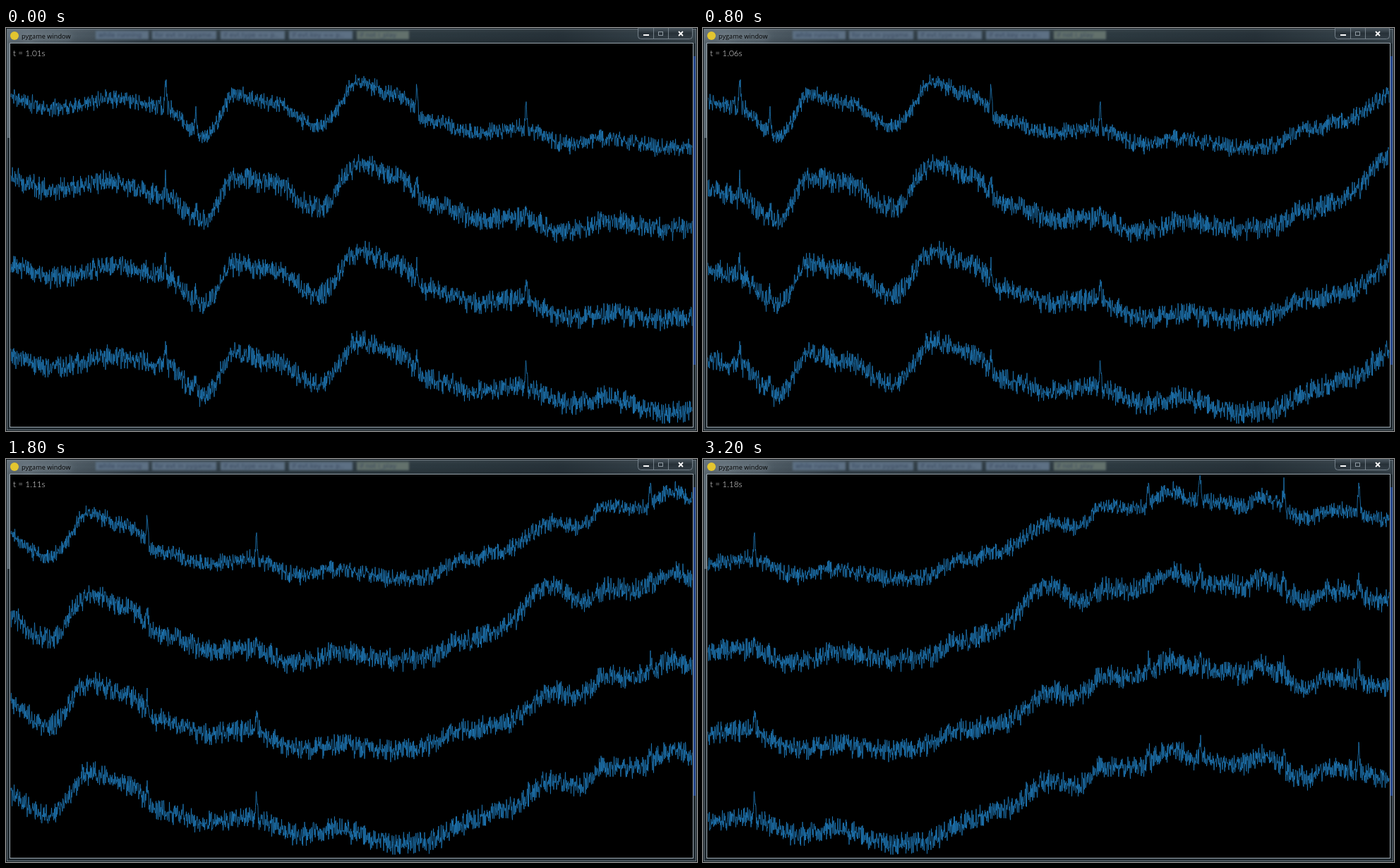
An HTML page with a canvas that plays this animation: 979x572 px, repeating every 3400 ms.

```html
<!DOCTYPE html>
<html lang="en">
<head>
<meta charset="utf-8">
<title>pygame window</title>
<style>
  html, body { margin: 0; width: 100%; height: 100%; overflow: hidden; background: #000; }
  canvas { display: block; }
</style>
</head>
<body>
<canvas id="stage" width="979" height="572"></canvas>
<script>
const W = 979, H = 572, STEP = 200, LOOP = 3400;
const LEFT = 7, RIGHT = 972, WORLD = 1645;
const DENSITY = 2; // samples per pixel
const ctx = document.getElementById('stage').getContext('2d');

// Turning points of the slow wave: x, y
const turns = [
  [0, 97], [60, 114], [160, 100], [224, 112], [280, 155], [326, 95], [380, 107], [442, 140],
  [502, 78], [552, 95], [600, 132], [670, 150], [725, 142], [800, 165], [850, 156], [930, 169],
  [975, 167], [1031, 144], [1086, 130], [1156, 90], [1196, 96], [1231, 70], [1280, 70],
  [1328, 45], [1360, 58], [1435, 66], [1455, 54], [1520, 86], [1550, 71], [WORLD, 86]
];

// Spikes: x, height
const spikes = [[226, 38], [269, 34], [582, 36], [737, 38], [1295, 30], [1368, 34], [1487, 30], [1593, 44]];

const bell = (x, mid, width) => Math.exp(-(((x - mid) / width) ** 2));

const channels = [
  { noise: 15, spike: 1, drop: () => 0 },
  { noise: 19, spike: 0.55, drop: x => 115 + 12 * bell(x, 220, 60) + 13 * bell(x, 745, 90) - 27 * bell(x, 1145, 45) },
  { noise: 19, spike: 0.6, drop: x => 239 + 10 * bell(x, 840, 110) + 6 * bell(x, 1090, 60) },
  { noise: 19, spike: 0.75, drop: x => 367 + 11 * bell(x, 960, 90) }
];

function random(seed) {
  return () => {
    seed = (seed + 0x6D2B79F5) | 0;
    let n = Math.imul(seed ^ (seed >>> 15), 1 | seed);
    n = (n + Math.imul(n ^ (n >>> 7), 61 | n)) ^ n;
    return ((n ^ (n >>> 14)) >>> 0) / 4294967296;
  };
}

function waveAt(x) {
  const i = Math.max(1, turns.findIndex(p => p[0] >= x));
  const [x0, y0] = turns[i - 1], [x1, y1] = turns[i];
  return y0 + (y1 - y0) * (1 - Math.cos(Math.PI * (x - x0) / (x1 - x0))) / 2;
}

function makeTrace({ noise, spike, drop }, i) {
  const rnd = random(41 + i * 977), ys = [];
  for (let x = 0; x <= WORLD; x += 1 / DENSITY) {
    const peak = spikes.reduce((sum, [mid, h]) => sum + h * Math.max(0, 1 - Math.abs(x - mid) / 3), 0);
    ys.push(waveAt(x) + drop(x) - peak * spike + (rnd() + rnd() - 1) * noise);
  }
  return ys;
}

const traces = channels.map(makeTrace);

// The signal advances a little slower after the sixth refresh
const scrollAt = n => Math.round(43.5 * n - 3.2 * Math.max(0, n - 6));

function gradient(c, x, y, ...colors) {
  const g = c.createLinearGradient(0, 0, x, y);
  colors.forEach((color, i) => g.addColorStop(i / (colors.length - 1), color));
  return g;
}

function drawButtons(c) {
  c.fillStyle = gradient(c, 0, 15, '#4d5962', '#273138', '#323d45');
  c.strokeStyle = '#75818a';
  c.beginPath();
  c.roundRect(895.5, -3.5, 77, 19, 4);
  c.fill();
  c.stroke();
  c.fillStyle = '#75818a';
  c.fillRect(917, 0, 1, 15);
  c.fillRect(938, 0, 1, 15);
  c.fillStyle = '#fff';
  c.fillRect(903, 9, 8, 2);
  c.strokeStyle = '#8f9aa2';
  c.strokeRect(924.5, 5.5, 6, 5);
  c.strokeStyle = '#fff';
  c.lineWidth = 1.8;
  c.beginPath();
  c.moveTo(953, 5); c.lineTo(959, 11);
  c.moveTo(959, 5); c.lineTo(953, 11);
  c.stroke();
  c.lineWidth = 1;
}

function drawBehindGlass(c) {
  const tabs = [
    [127, 75, 'while running'], [207, 91, 'for evt in pygame..'], [304, 91, 'if evt.type == p..'],
    [401, 90, 'if evt.key == p..'], [497, 74, 'if not i_play']
  ];
  c.save();
  c.filter = 'blur(1.8px)';
  c.font = '9px "DejaVu Sans", sans-serif';
  tabs.forEach(([x, w, label], i) => {
    c.fillStyle = i < 4 ? '#5d7084' : '#63716c';
    c.fillRect(x, 4, w, 12);
    c.fillStyle = '#36455a';
    c.fillText(label, x + 4, 13);
  });
  c.restore();
}

function makeWindow() {
  const layer = document.createElement('canvas');
  layer.width = W;
  layer.height = H;
  const c = layer.getContext('2d');
  c.fillStyle = '#222b31';
  c.fillRect(0, 0, W, H);
  c.fillStyle = gradient(c, W, 0, '#66737d', '#35424b', '#303d45', '#2c3940', '#263138', '#39464e');
  c.fillRect(0, 0, W, 22);
  c.fillStyle = gradient(c, 0, 22, 'rgba(255,255,255,.1)', 'rgba(0,0,0,0)', 'rgba(0,0,0,.15)');
  c.fillRect(0, 0, W, 22);
  drawBehindGlass(c);

  c.fillStyle = '#5d6a73';
  c.fillRect(1, 22, 4, 134);
  c.fillStyle = '#24468c';
  c.fillRect(974, 40, 4, 438);

  c.strokeStyle = '#0d1317';
  c.strokeRect(0.5, 0.5, W - 1, H - 1);
  c.strokeStyle = '#6b7780';
  c.strokeRect(1.5, 1.5, W - 3, H - 3);
  c.strokeStyle = '#98a4ac';
  c.strokeRect(5.5, 21.5, 968, 545);
  c.fillStyle = '#000';
  c.fillRect(6, 22, 967, 544);
  drawButtons(c);

  c.fillStyle = '#e3c52f';
  c.beginPath();
  c.arc(12, 11, 6, 0, Math.PI * 2);
  c.fill();

  c.font = '9.2px "Open Sans", "Noto Sans", sans-serif';
  c.shadowColor = 'rgba(210,222,232,.8)';
  c.shadowBlur = 9;
  c.fillStyle = '#000';
  c.fillText('pygame window', 22, 14.5);
  return layer;
}

const frame = makeWindow();

function drawTrace(ys, shift) {
  ctx.beginPath();
  for (let x = LEFT; x <= RIGHT; x += 1 / DENSITY) ctx.lineTo(x, ys[(x + shift) * DENSITY]);
  ctx.stroke();
}

function draw(now) {
  const shift = scrollAt(Math.floor((now % LOOP) / STEP));
  ctx.drawImage(frame, 0, 0);
  ctx.save();
  ctx.beginPath();
  ctx.rect(LEFT - 1, 23, RIGHT - LEFT + 2, 542);
  ctx.clip();
  ctx.strokeStyle = '#1f77b4';
  ctx.lineWidth = 0.85;
  ctx.lineJoin = 'bevel';
  traces.forEach(ys => drawTrace(ys, shift));
  ctx.restore();

  const seconds = 1.0105 + shift * 0.000256;
  ctx.fillStyle = '#e6e6e6';
  ctx.font = '300 11.8px Lato, "Open Sans", sans-serif';
  ctx.fillText(`t = ${seconds.toFixed(2)}s`, 10, 39.5);
}

const start = performance.now();

function tick() {
  draw(performance.now() - start);
  requestAnimationFrame(tick);
}

tick();
</script>
</body>
</html>
```
